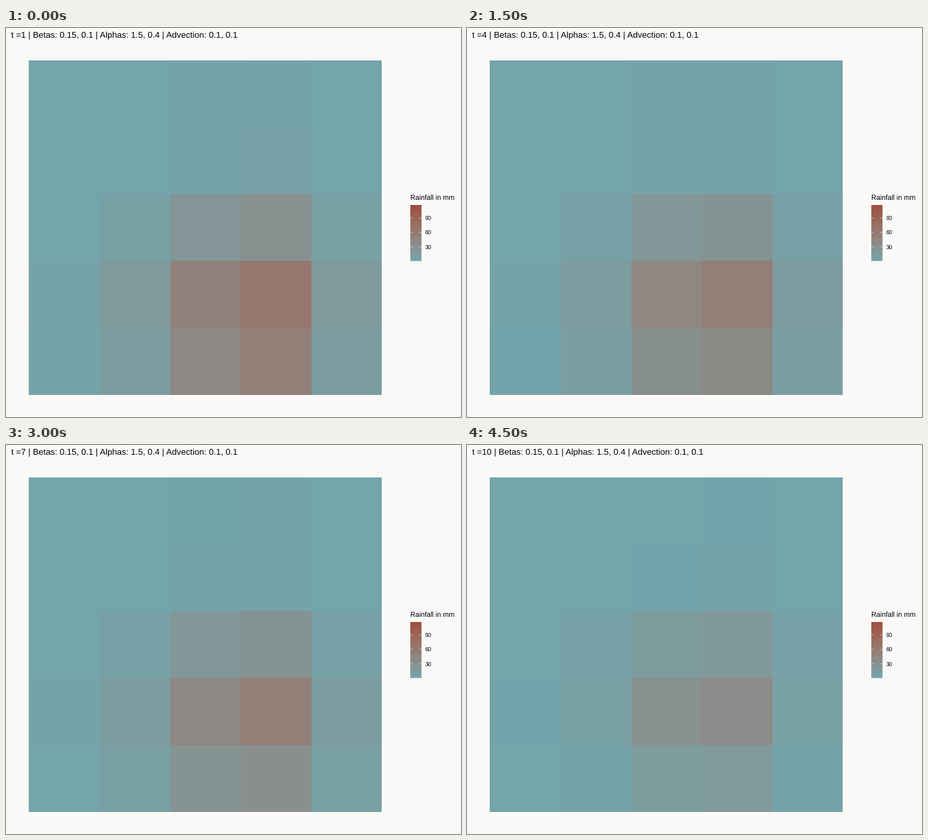
Recreate the animation shown at these times as a matplotlib script. Size 700 px wide and 600 px high, loop 5 s.

```python
import matplotlib.pyplot as plt
import numpy as np
from matplotlib.animation import FuncAnimation

W, H, DPI = 700, 600, 100
BG = "#FAF9F7"
LOW, HIGH = (113, 166, 173), (158, 78, 61)
TOP_MM, DRY_MM = 117, 2
PEAKS = [64, 72, 117, 54, 38, 18, 52, 57, 62, 36]  # wettest cell at each step, mm
WHITE = np.array([0.9505, 1.0, 1.089])
TO_XYZ = np.array([[0.4124, 0.3576, 0.1805],
                   [0.2126, 0.7152, 0.0722],
                   [0.0193, 0.1192, 0.9505]])

plt.rcParams["font.family"] = "Liberation Sans"
plt.rcParams["text.hinting"] = "none"


def to_lab(rgb):
    c = np.array(rgb) / 255
    lin = np.where(c > 0.04045, ((c + 0.055) / 1.055) ** 2.4, c / 12.92)
    x, y, z = np.cbrt(TO_XYZ @ lin / WHITE)
    return np.array([116 * y - 16, 500 * (x - y), 200 * (y - z)])


def to_rgb(lab):
    y = (lab[..., 0] + 16) / 116
    xyz = np.stack([y + lab[..., 1] / 500, y, y - lab[..., 2] / 200], -1) ** 3 * WHITE
    lin = np.clip(xyz @ np.linalg.inv(TO_XYZ).T, 0, 1)
    return np.where(lin > 0.0031308, 1.055 * lin ** (1 / 2.4) - 0.055, 12.92 * lin)


def shade(mm):
    """Colour of a rainfall amount, blended in Lab space."""
    t = np.clip(np.asarray(mm, float) / TOP_MM, 0, 1)[..., None]
    a, b = to_lab(LOW), to_lab(HIGH)
    return to_rgb(a + (b - a) * t)


def rainfall(i):
    """A storm cell whose weight drifts from the south row to the north."""
    across = np.array([0.06, 0.25, 0.8, 1, 0.25])
    down = np.array([0.06, 0.08, 0.45 + 0.01 * i, 1, 0.82 - 0.035 * i])
    return np.maximum(DRY_MM, PEAKS[i] * np.outer(down, across))


fig = plt.figure(figsize=(W / DPI, H / DPI), dpi=DPI, facecolor=BG)
ax = fig.add_axes([0, 0, 1, 1])
ax.axis("off")
ax.set_xlim(0, W)
ax.set_ylim(H, 0)


def label(x, y, text, px):
    return ax.text(x, y, text, fontsize=px * 72 / DPI, color="black", va="baseline")


def box(x, y, w, h, **style):
    return ax.add_patch(plt.Rectangle((x, y), w, h, lw=0, **style))


xs = np.round(np.linspace(35.4, 578.4, 6))
ys = np.round(np.linspace(49.8, 565.8, 6))
cells = [box(x, y, w, h, antialiased=False)
         for y, h in zip(ys, np.diff(ys)) for x, w in zip(xs, np.diff(xs))]

# Legend
BAR_X, BAR_W, BAR_TOP, BAR_BOTTOM = 622, 17.28, 273, 359.4
PX_PER_MM = (BAR_BOTTOM - BAR_TOP) / TOP_MM
for y in range(BAR_TOP, 360):
    box(BAR_X, y, BAR_W, min(1, BAR_BOTTOM - y), snap=False,
        color=shade((BAR_BOTTOM - y - 0.5) / PX_PER_MM))
for mm in (30, 60, 90):
    y = BAR_BOTTOM - mm * PX_PER_MM
    for x in (BAR_X, BAR_X + BAR_W * 0.8):
        ax.plot((x, x + BAR_W / 5), (y, y), color="white", lw=0.4,
                solid_capstyle="butt", snap=False)
    label(644.7, y + 3.2, str(mm), 9)
label(621.7, 266, "Rainfall in mm", 10.8)
title = label(8, 15.5, "", 13.2)


def update(i):
    title.set_text(f"t ={i + 1} | Betas: 0.15, 0.1 | Alphas: 1.5, 0.4 | Advection: 0.1, 0.1")
    for cell, color in zip(cells, shade(rainfall(i)).reshape(-1, 3)):
        cell.set_facecolor(color)
    return [title, *cells]


anim = FuncAnimation(fig, update, frames=len(PEAKS), interval=500, repeat=True, repeat_delay=0)
plt.show()
```
